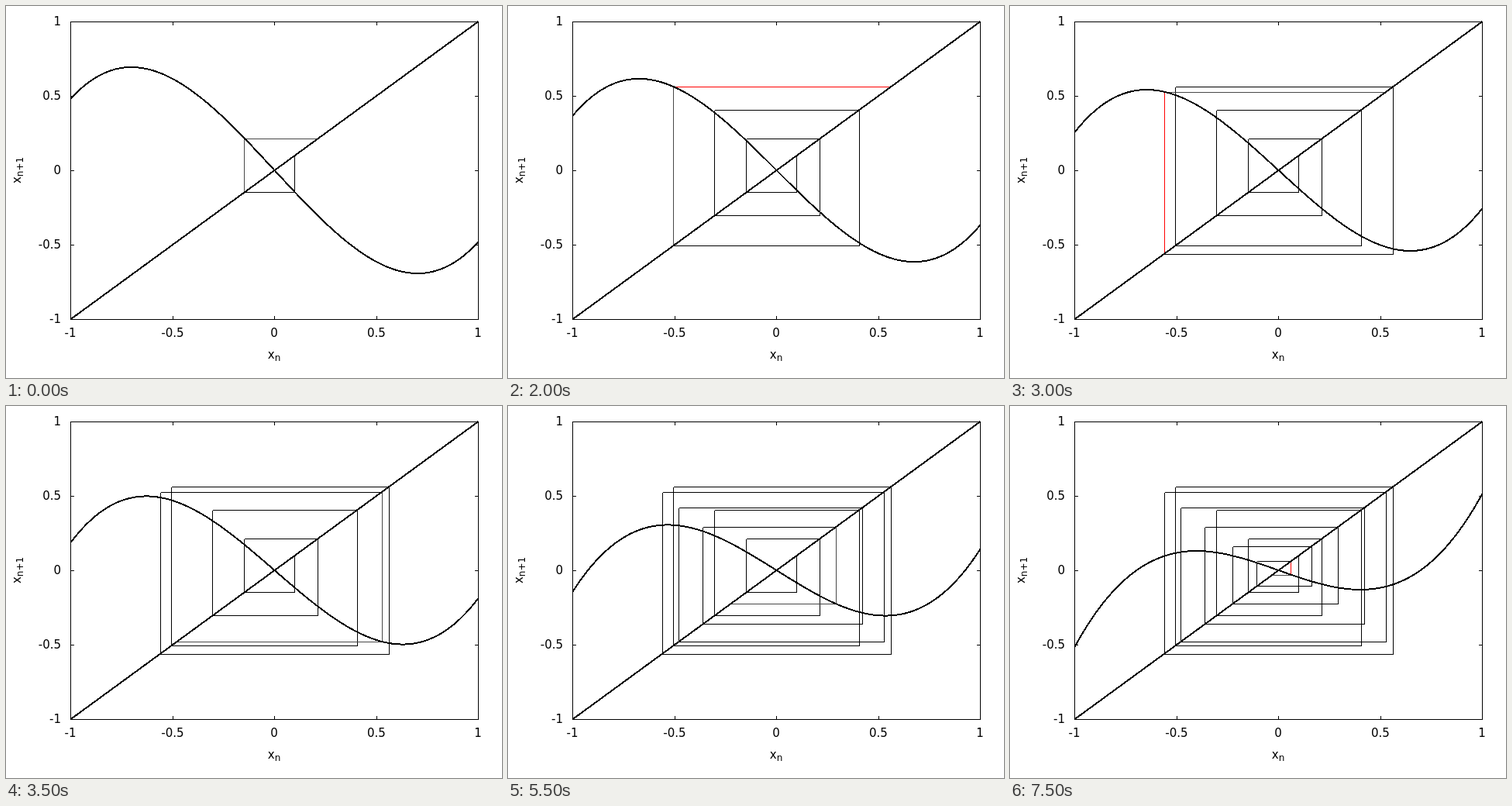
An HTML page that plays this animation: 640x480 px, repeating every 8000 ms.

```html
<!DOCTYPE html>
<html>
<head>
<meta charset="utf-8">
<style>
html, body { margin: 0; width: 100%; height: 100%; overflow: hidden; background: #fff; }
svg { display: block; }
path { fill: none; stroke: #000; shape-rendering: crispEdges; }
.thick { stroke-width: 2; }
text { font: 15px "DejaVu Sans", sans-serif; }
.sub { font-size: 12px; }
</style>
</head>
<body>
<svg width="640" height="480" viewBox="0 0 640 480">
  <path id="axes"/>
  <g id="web"></g>
  <path class="thick" d="M83 404.5L609.5 20"/>
  <path class="thick" id="curve"/>
  <g id="labels"></g>
  <text x="346" y="455" text-anchor="middle">x<tspan class="sub" dy="3">n</tspan></text>
  <text transform="translate(18.5 212) rotate(-90)" text-anchor="middle">x<tspan class="sub" dy="3">n+1</tspan></text>
</svg>
<script>
const STEP = 500;
// Slope parameter of the map x -> x^3 - a x at every step
const slopes = [1.48, 1.458, 1.435, 1.405, 1.367, 1.314, 1.2555, 1.187,
  1.11, 1.03, 0.943, 0.8565, 0.77, 0.678, 0.582, 0.485];
const redUp = [6, 13, 15], redAcross = [4, 13];
const el = id => document.getElementById(id);
const map = (x, a) => x * x * x - a * x;
const px = x => Math.round(346 + 263 * x) + 0.5;
const py = y => Math.round(212 - 192 * y) + 0.5;

const orbit = [0.1, map(0.1, slopes[0])];
slopes.forEach((a, k) => orbit.push(map(orbit[k + 1], a)));

function drawAxes() {
  let d = "M83.5 20.5H609.5V404.5H83.5Z", labels = "";
  for (const v of [-1, -0.5, 0, 0.5, 1]) {
    const x = px(v), y = py(v);
    d += `M${x} 20V25M${x} 400V405M83 ${y}H88M605 ${y}H610`;
    labels += `<text x="${x - 0.5}" y="427" text-anchor="middle">${v}</text>` +
      `<text x="71" y="${y + 4.5}" text-anchor="end">${v}</text>`;
  }
  el("axes").setAttribute("d", d);
  el("labels").innerHTML = labels;
}

function drawStep(k) {
  const line = (d, color) => `<path d="${d}" style="stroke:${color}"/>`;
  let web = "";
  for (let j = 0; j <= k + 1; j++) {
    const x = orbit[j], next = orbit[j + 1];
    const color = reds => j <= k ? "#000" : reds.includes(k) ? "#f00" : "#484848";
    web += line(`M${px(x)} ${py(x)}V${py(next)}`, color(redUp)) +
      line(`M${px(x)} ${py(next)}H${px(next)}`, color(redAcross));
  }
  el("web").innerHTML = web;

  const points = [];
  for (let i = 0; i < 100; i++) {
    const x = -1 + 2 * i / 99;
    points.push(`${346.5 + 263 * x} ${212 - 192 * map(x, slopes[k])}`);
  }
  el("curve").setAttribute("d", "M" + points.join("L"));
}

let shown = -1;
const start = performance.now();
function tick() {
  const k = Math.floor((performance.now() - start) / STEP) % slopes.length;
  if (k !== shown) drawStep(shown = k);
  requestAnimationFrame(tick);
}
drawAxes();
tick();
</script>
</body>
</html>
```
